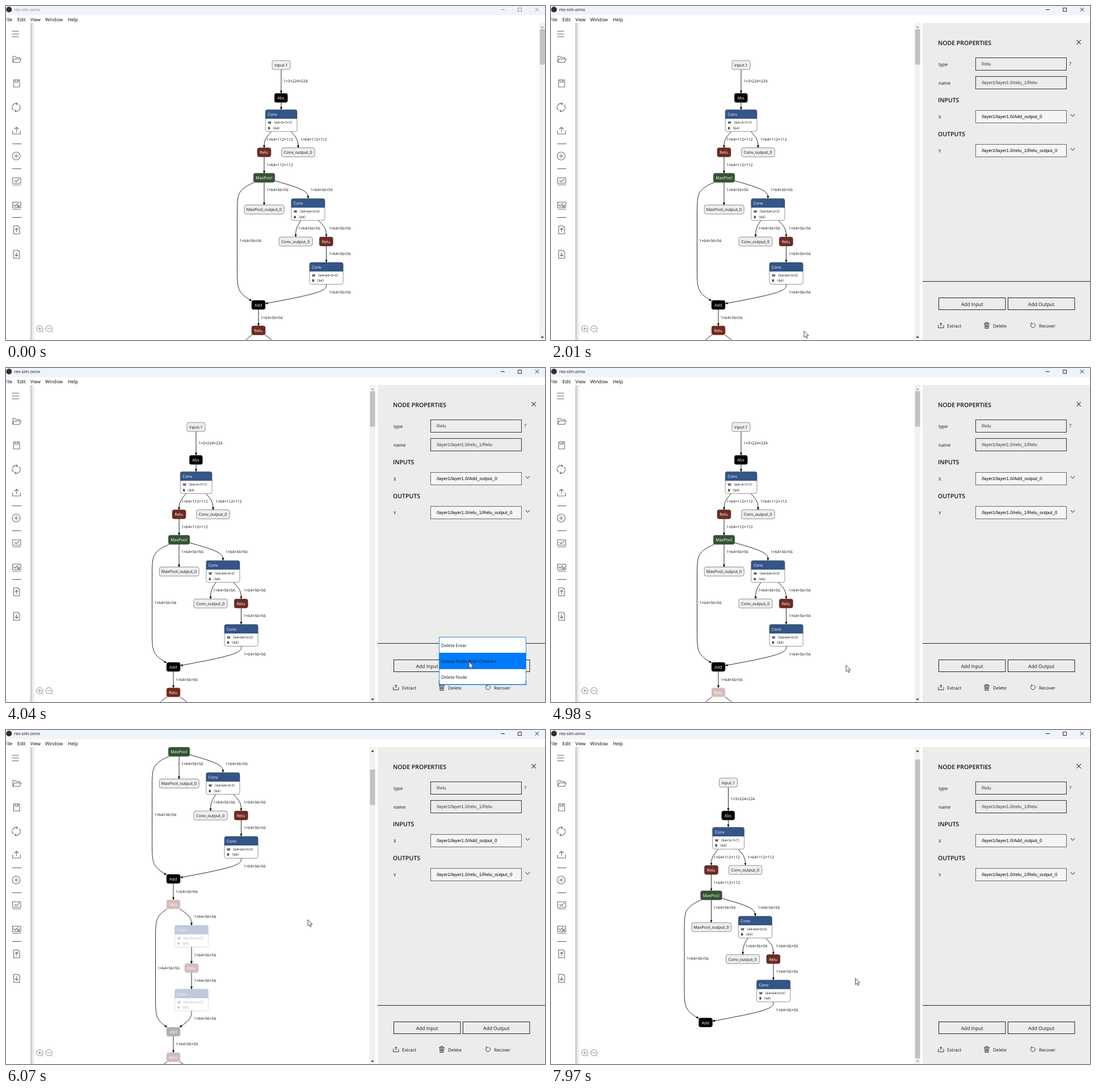
Animation, 950 px wide and 590 px high, one loop 8000 ms. Source, as an HTML page:

```html
<!DOCTYPE html>
<html lang="en">
<head>
<meta charset="utf-8">
<title>Model editor</title>
<style>
  html, body { margin: 0; width: 100%; height: 100%; overflow: hidden; background: #fff; }
  svg { display: block; }
  text { font-family: "Open Sans", "Noto Sans", "Noto Sans CJK SC", sans-serif; text-rendering: geometricPrecision; white-space: pre; }
  .arial { font-family: "Liberation Sans", sans-serif; }
  .icon { fill: none; stroke: #6c6c6c; stroke-width: 1.1; stroke-linecap: round; stroke-linejoin: round; }
  .edge { fill: none; stroke: #000; stroke-width: .85; marker-end: url(#tip); }
</style>
</head>
<body>
<svg id="stage" width="950" height="590" viewBox="0 0 950 590"></svg>
<script>
const LOOP = 8000;
const stage = document.getElementById('stage');

// ---- markup helpers ----
const text = (x, y, s, size, extra = '') => `<text x="${x}" y="${y}" font-size="${size}" ${extra}>${s}</text>`;
const rect = (x, y, w, h, fill, extra = '') => `<rect x="${x}" y="${y}" width="${w}" height="${h}" fill="${fill}" ${extra}/>`;
const path = (d, extra = '') => `<path d="${d}" ${extra}/>`;
const icon = (d, extra = '') => path(d, `class="icon" ${extra}`);
const group = (id, body, extra = '') => `<g id="${id}" ${extra}>${body}</g>`;
const MID = 'text-anchor="middle"';

// ---- graph parts ----
const BLUE = '#335588', RED = '#702921', GREEN = '#335533';
const BORDER = 'stroke="#333" stroke-width=".7" stroke-opacity=".75" rx="3.4"';

const pill = (cx, cy, w, label, fill, ink, id = '') =>
  rect(cx - w / 2, cy - 8, w, 16, fill, BORDER + (id && ` id="${id}"`)) +
  text(cx - .3, cy + 2.9, label, 7.2, `${MID} fill="${ink}"`);
const op = (cx, cy, w, label, fill, id) => pill(cx, cy, w, label, fill, '#fff', id);
const port = (cx, cy, w, label) => pill(cx, cy, w, label, '#eee', '#111');

const conv = (x, y, w, shape) =>
  rect(x, y, w, 38.5, '#fff', 'rx="3.4"') +
  path(`M${x} ${y + 16}v-12.6q0-3.4 3.4-3.4h${w - 6.8}q3.4 0 3.4 3.4v12.6z`, `fill="${BLUE}"`) +
  rect(x, y, w, 38.5, 'none', BORDER) +
  text(x + 4, y + 11, 'Conv', 7.2, 'fill="#fff"') +
  text(x + 4.5, y + 25.2, `<tspan font-weight="700">W</tspan> 〈${shape}〉`, 5.9) +
  text(x + 4.5, y + 34.4, '<tspan font-weight="700">B</tspan> 〈64〉', 5.9);

// uniform cubic B-spline, straight at both ends
function edge(...pts) {
  const mix = (...ws) => (...ps) => [0, 1].map(k => ps.reduce((s, p, i) => s + p[k] * ws[i], 0)).join(' ');
  const third = mix(2 / 3, 1 / 3), knot = mix(1 / 6, 4 / 6, 1 / 6);
  const last = pts[pts.length - 1];
  const list = [...pts, last];
  let d = `M${pts[0].join(' ')}L${mix(5 / 6, 1 / 6)(pts[0], pts[1])}`;
  for (let i = 1; i < pts.length; i++) {
    d += `C${third(list[i - 1], list[i])} ${third(list[i], list[i - 1])} ${knot(list[i - 1], list[i], list[i + 1])}`;
  }
  return path(`${d}L${last.join(' ')}`, 'class="edge"');
}
const down = (x, y, end) => path(`M${x} ${y}V${end}`, 'class="edge"');
const label = (x, cy, s) => text(x, cy + 2.4, s, 6.8, 'fill="#111"');
const S56 = '1×64×56×56', S112 = '1×64×112×112';

const split = y =>
  edge([306.4, y + 8], [327, y + 22.5], [327, y + 37]) +
  edge([283.8, y + 8], [263.5, y + 22.5], [263.5, y + 56], [263.5, y + 169], [263.5, y + 202.5], [283.8, y + 217]);

const head =
  down(335, 112.5, 154) + down(335, 170.5, 183) +
  edge([317.5, 222], [305, 236], [305, 250.5]) +
  edge([352.5, 222], [365, 236], [365, 250.5]) +
  down(305, 266.5, 295.5) + down(305, 311.5, 351.5) +
  edge([324, 308.8], [382.4, 325.5], [382.4, 340]) +
  edge([287.8, 311.4], [257.5, 325.5], [257.5, 359.5], [257.5, 472], [257.5, 505.5], [283, 520.8]) +
  edge([369.9, 378.7], [360.6, 393], [360.6, 408]) +
  edge([400.8, 378.7], [414.5, 393], [414.5, 408]) +
  down(414.5, 424, 453) +
  edge([414.5, 491.5], [414.5, 505.5], [307, 525.7]) +
  label(339, 133, '1×3×224×224') +
  label(309, 236, S112) + label(369, 236, S112) + label(309, 281, S112) +
  [[309, 325], [387, 325], [261.5, 415], [365, 393], [419, 393], [419, 438], [419, 505.5]]
    .map(([x, y]) => label(x, y, S56)).join('') +
  port(335, 104.2, 32, 'input.1') + op(334.8, 162.3, 23, 'Abs', '#000') +
  conv(307.2, 183.2, 55.8, '64×3×7×7') +
  op(305, 258.5, 24, 'Relu', RED) + port(365, 258.5, 58.5, 'Conv_output_0') +
  op(305, 303.4, 37.5, 'MaxPool', GREEN) + port(305.2, 359.5, 70, 'MaxPool_output_0') +
  conv(352.8, 340.2, 59.2, '64×64×3×3') +
  port(360.6, 416, 59, 'Conv_output_0') + op(414.3, 416, 24, 'Relu', RED) +
  conv(385, 453, 59.2, '64×64×3×3') + op(295, 528, 24, 'Add', '#000');

const tail =
  down(295, 536, 565) + split(573) + split(843) +
  down(327, 648.5, 677.5) + down(327, 693.5, 722.5) +
  edge([327, 761.5], [327, 775], [306, 790]) + down(295, 806, 835) +
  [[299, 550.3], [331.5, 595], [267, 685.5], [331.5, 662.5], [331.5, 707.5], [331.5, 775], [299.5, 820]]
    .map(([x, y]) => label(x, y, S56)).join('') +
  group('doomed',
    op(295, 573, 24, 'Relu', RED, 'picked') + conv(297.4, 610, 59.2, '64×64×3×3') +
    op(327, 685.5, 24, 'Relu', RED) + conv(297.4, 722.7, 59.2, '64×64×3×3') +
    op(295, 798, 24, 'Add', '#000') + op(295, 843, 24, 'Relu', RED));

// ---- window frame and side bar ----
const fileIcon = y => `M13.5 ${y}h7.5l3 3v11h-10.5z`;
const monitor = y => `M11.5 ${y}h14.5v9.5h-14.5zM12 ${y + 12.5}h14`;
const rule = y => path(`M11 ${y}h16`, 'stroke="#555"');
const sidebar =
  rect(43, 30, 9, 560, 'url(#shade)') + rect(0, 30, 43, 560, '#fff') +
  icon('M11 44.5h11.5M11 49.5h11.5M11 54.5h11.5') +
  icon('M12 99.5v-10.5h4.5l1.5 2h6v2.5M12 99.5l2.7-6h12l-2.7 6z') +
  icon('M13.5 130.5h10.5v12.5h-10.5zM16 130.5v4h5.5v-4M19.8 132v1') +
  icon('M13 183.5A6.5 6.5 0 0 1 20 172.8M23 174.5A6.5 6.5 0 0 1 16 185.2M18.5 171l2 1.8-2 1.8M17.5 183.5l-2 1.8 2 1.7') +
  icon('M11.5 220.5v5.5h14v-5.5M18.5 222v-7.5M15 217.5l3.5-3.3 3.5 3.3') +
  rule(243.5) +
  icon('M25 265a7 7 0 1 1-14 0a7 7 0 1 1 14 0M14.5 265h7M18 261.5v7') +
  rule(287.5) +
  icon(monitor(303.5) + 'M15 308l3 2.5 5.5-5') +
  icon(monitor(346.5) + 'M13.5 351l2.5 2.5 5-5M20 351.5l4 4M24 351.5l-4 4') +
  rule(373.5) +
  icon(fileIcon(388.5) + 'M18.7 399v-6.5M16.2 395l2.5-2.5 2.5 2.5') +
  icon(fileIcon(431.5) + 'M18.7 435.5v6.5M16.2 439.5l2.5 2.5 2.5-2.5');

const lens = x => `M${x + 5.5} 570a5.5 5.5 0 1 1-11 0a5.5 5.5 0 1 1 11 0M${x + 4} 574l2.5 2.5M${x - 2.5} 570h5`;
const zoom = icon(lens(59.3) + 'M59.3 567.5v5' + lens(75.7), 'style="stroke-width:.8"');

const titlebar =
  rect(0, 0, 950, 30, '#fff') + rect(0, 0, 950, 16.5, '#eff4fa') +
  '<circle cx="5.3" cy="6.3" r="5" fill="#2c2f38"/>' +
  group('title', text(14.5, 9.3, 'res-sim.onnx', 7.6) +
    path('M872 6.5h7M902.5 3.5h6v6h-6zM932.8 3l6.4 6.5M939.2 3l-6.4 6.5', 'fill="none" stroke="currentColor" stroke-width=".9"'),
    'fill="currentColor"') +
  [[-2, 'File'], [20, 'Edit'], [43, 'View'], [69, 'Window'], [109, 'Help']]
    .map(([x, s]) => text(x, 26.8, s, 8.3)).join('');

const scrollbar = group('bar',
  rect(0, 30, 10.5, 560, '#f1f1f1') +
  rect(1, 41, 8.8, 62.5, '#c1c1c1', 'id="thumb"') +
  path('M2.7 38.5l2.6-3 2.6 3z', 'id="up"') + path('M2.7 584l2.6 3 2.6-3z', 'id="low"'));

// ---- property panel ----
const heading = (y, s) => text(682, y, s, 10.5, 'font-weight="600" fill="#111"');
const field = (y, name, value, fill, line, ink) =>
  text(683, y + 3, name, 8, 'fill="#111"') +
  rect(748.5, y - 11, 160, 22, fill, `stroke="${line}"`) +
  text(759, y + 2.8, value, 8, `class="arial" fill="${ink}"`);
const fixed = (y, name, value) => field(y, name, value, '#ececeb', '#333', '#3a3a3a');
const entry = (y, name, value) => field(y, name, value, '#f5f5f4', '#666', '#000') +
  icon(`M916 ${y - 4}l3.5 3.5 3.5-3.5`);
const button = (x, s) =>
  rect(x, 515.5, 117.5, 21, '#ececeb', 'stroke="#222"') +
  text(x + 58.7, 530, s, 8.5, `${MID} fill="#111"`);
const tool = (x, s) => text(x, 567.5, s, 7.9, 'fill="#111"');
const DARK = 'style="stroke:#222;stroke-width:.9"';

const panel = group('panel',
  rect(651, 30, 5, 560, '#fff') + rect(655, 30, 295, 560, '#ececeb') +
  heading(68.8, 'NODE PROPERTIES') + heading(169.8, 'INPUTS') + heading(229.8, 'OUTPUTS') +
  icon('M926.8 60.5l6.8 6.8M933.6 60.5l-6.8 6.8', 'style="stroke:#444"') +
  fixed(102.5, 'type', 'Relu') + text(913.5, 105.3, '?', 8) +
  fixed(135.5, 'name', '/layer1/layer1.0/relu_1/Relu') +
  entry(195.5, 'X', '/layer1/layer1.0/Add_output_0') +
  entry(255.5, 'Y', '/layer1/layer1.0/relu_1/Relu_output_0') +
  path('M655 486.5h295', 'stroke="#222"') +
  button(683.5, 'Add Input') + button(805.5, 'Add Output') +
  icon('M682.5 564v4.5h9.5v-4.5M687.2 565.5v-5.5M685 562l2.2-2.2 2.2 2.2', DARK) + tool(698, 'Extract') +
  icon('M763.5 561h9M766 560.5v-1.5h4v1.5M764.5 561l.5 8.5h6l.5-8.5M766.7 563v4.5M768 563v4.5M769.3 563v4.5', DARK) + tool(779, 'Delete') +
  icon('M847 561a4 4 0 1 0 4.5-.3M846.5 559.3l.8 2 2.2-.8', DARK) + tool(860, 'Recover'));

const items = ['Delete Enter', 'Delete Node With Children', 'Delete Node'];
const menu = group('menu', items.map((s, i) => {
  const y = 475.5 + i * 28;
  return rect(763.5, y, 153, 28, '#fff', `id="row${i}" stroke="#1a80e8" stroke-width=".9"`) +
    text(767, y + 17.2, s, 7.8, 'fill="#1c1c1c"');
}).join('') + path('M763.5 552v7.3h153v-7.3', 'fill="none" stroke="#0a78e8" stroke-width="1.5"'));

const pointer = group('pointer',
  '<circle id="press" r="7.7" fill="#ffe920"/>' +
  path('M0 0V11.3L2.6 8.9L4.4 12.9L6.2 12.1L4.4 8.2H8Z', 'id="arrow" fill="#fff" stroke="#222" stroke-width=".8"') +
  path('M-3.8.5C-5-1-3.5-2-2.5-1V-2.5Q-1.7-4-.8-2.8Q.2-4.2 1-2.8Q2.2-3.6 2.7-2.3Q4-2.6 4-1V1.5Q3.5 4 1 4H-.5Q-2 4-3.8.5Z',
    'id="fist" fill="#fff59a" stroke="#333" stroke-width=".9"'));

stage.innerHTML =
  `<defs>
    <marker id="tip" markerUnits="userSpaceOnUse" markerWidth="5" markerHeight="5" refX="4.6" refY="2.5" orient="auto"><path d="M0 .5L5 2.5L0 4.5z"/></marker>
    <linearGradient id="shade"><stop offset="0" stop-opacity=".26"/><stop offset=".4" stop-opacity=".09"/><stop offset="1" stop-opacity="0"/></linearGradient>
  </defs>` +
  rect(0, 0, 950, 590, '#fff') + group('graph', head + group('tail', tail)) +
  sidebar + zoom + scrollbar + panel + titlebar + menu + pointer;

const el = {};
stage.querySelectorAll('[id]').forEach(n => el[n.id] = n);

// ---- motion ----
// [start, end, steps]: the screen refreshes only at these steps
const bursts = [
  [70, 800, 12], [1070, 1800, 12], [1950, 2690, 12], [2820, 3220, 7], [3570, 4040, 8],
  [4240, 4980, 11], [5050, 5800, 12], [5880, 6680, 12], [6750, 7470, 11], [7570, 7970, 7]
];
function snap(t) {
  let s = 0;
  for (const [a, b, n] of bursts) {
    if (t < a) break;
    const step = (b - a) / (n - 1);
    s = a + step * Math.min(n - 1, Math.floor((t - a + 10) / step));
  }
  return s;
}

// [time, x, y, eased]
const route = [
  [0, 880, 590], [800, 654, 335, 1], [1000, 654, 335], [1640, 443, 577, 1], [1800, 446, 574],
  [2020, 446, 574], [2690, 790, 566, 1], [2750, 790, 566], [3220, 808, 565, 1], [3500, 808, 565],
  [3900, 816, 524, 1], [4040, 816, 519], [4240, 816, 519], [4980, 520, 525, 1], [5040, 520, 525],
  [5323, 520, 340], [5600, 520, 260], [5860, 520, 260], [6025, 532, 335], [6520, 770, 575, 1],
  [6680, 787, 574], [7030, 793, 566], [7110, 797, 550], [7470, 800, 490], [7570, 800, 490],
  [7970, 536.5, 438.5, 1]
];
const drag = [[5040, 0], [5323, 147], [5600, 255], [5730, 265]];

function at(keys, t) {
  let i = 0;
  while (i < keys.length - 1 && keys[i + 1][0] <= t) i++;
  const a = keys[i], b = keys[i + 1];
  if (!b || t < a[0]) return a.slice(1);
  let p = (t - a[0]) / (b[0] - a[0]);
  if (b[3]) p = p * p * (3 - 2 * p);
  return a.slice(1, 3).map((v, k) => v + (b[k + 1] - v) * p);
}

const show = (node, on) => node.setAttribute('visibility', on ? 'visible' : 'hidden');
const within = (t, ...spans) => spans.some(([a, b]) => t >= a && t < b);

function draw(time) {
  const t = snap(time);
  const [x, y] = at(route, t);
  const opened = t >= 2000, cut = t >= 7620;
  const scroll = at(drag, t)[0];

  el.title.setAttribute('color', t >= 1950 ? '#111' : '#888');
  el.graph.setAttribute('transform', cut ? 'translate(-22.5 -11.3)' : `translate(${opened ? 0 : 150} ${-scroll})`);
  el.tail.setAttribute('display', cut ? 'none' : 'inline');
  el.doomed.setAttribute('opacity', t >= 4300 ? .3 : 1);
  el.picked.setAttribute('stroke', t >= 1790 ? '#c8622c' : '#333');

  el.bar.setAttribute('transform', `translate(${opened ? 640.7 : 940} 0)`);
  el.thumb.setAttribute('y', cut ? 52 : 41 + scroll * .109);
  el.thumb.setAttribute('height', cut ? 528 : 62.5);
  el.up.setAttribute('fill', cut || scroll > 0 ? '#222' : '#999');
  el.low.setAttribute('fill', cut ? '#999' : '#222');
  show(el.panel, opened);

  // hover follows the pointer one refresh later
  show(el.menu, within(t, [2880, 4240], [6670, 7570]));
  const [hx, hy] = at(route, t - 70);
  const hot = hx > 763 && hx < 917 ? Math.floor((hy - 475) / 28) : -1;
  items.forEach((_, i) => el['row' + i].setAttribute('fill', i === hot ? '#007bff' : '#fff'));

  const grab = within(t, [5050, 5870]);
  show(el.pointer, t >= 70);
  el.pointer.setAttribute('transform', `translate(${x} ${y})`);
  el.press.setAttribute('opacity', grab || within(t, [1950, 2000], [2820, 2880], [6600, 6670]) ? 1 : 0);
  el.fist.setAttribute('opacity', grab ? 1 : 0);
  el.arrow.setAttribute('opacity', grab ? 0 : 1);
}

const start = performance.now();
function tick() {
  draw((performance.now() - start) % LOOP);
  requestAnimationFrame(tick);
}
tick();
</script>
</body>
</html>
```
